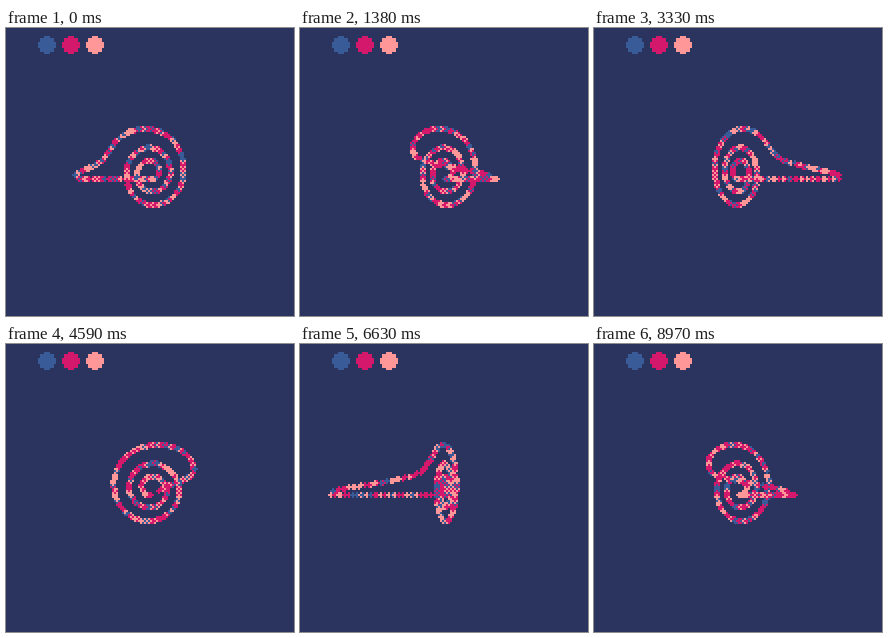
Recreate the animation shown at these times as an HTML page with a canvas. Size 288 px wide and 288 px high, loop 9000 ms.

```html
<!DOCTYPE html>
<html>
<head>
<meta charset="utf-8">
<style>
html, body { margin: 0; width: 100%; height: 100%; overflow: hidden; background: #2b335f; }
canvas { display: block; width: 288px; height: 288px; image-rendering: pixelated; }
</style>
</head>
<body>
<canvas width="144" height="144"></canvas>
<script>
const ctx = document.querySelector('canvas').getContext('2d');
const COLORS = ['#395c98', '#d4186c', '#ff9798'];
const FRAME = 30, LOOP = 9000, SPIN = 0.025, START = -0.511;
const FLAT_STEP = 2, DEEP_STEP = 3.6;

// Dense path: straight line in, flat spiral, then a tail that leaves the plane.
const path = [];
for (let i = 0; i <= 200; i++) {
  const u = 1 - i / 200;
  path.push([-20 * u, 6 - 0.5 * u, 113 * u]);
}
for (let k = 0; k <= 10; k += 0.01) {
  const r = 6 + 3.2 * k + 2.8 * Math.max(0, k - 8), a = k * Math.PI / 2;
  path.push([r * Math.sin(a), r * Math.cos(a), 0]);
}
const tail = [
  [12, -43, 0], [0, -44, 0], [-22, -42, 0], [-38, -33, 1], [-45, -20, 8],
  [-44, -13, 20], [-38, -8, 46], [-32, -3, 79], [-26, 2, 110], [-20, 6, 145]
];
const spline = (a, b, c, d, u) =>
  b + u / 2 * (c - a + u * (2 * a - 5 * b + 4 * c - d + u * (3 * (b - c) + d - a)));
for (let i = 0; i < tail.length - 3; i++) {
  const [a, b, c, d] = tail.slice(i, i + 4);
  for (let u = 0; u < 1; u += 0.01) path.push(b.map((v, j) => spline(a[j], v, c[j], d[j], u)));
}

// Beads along the path, closer together where it is flat.
const beads = [path[0]];
let run = 0;
for (let i = 1; i < path.length; i++) {
  const step = path[i][2] > 10 ? DEEP_STEP : FLAT_STEP;
  run += Math.hypot(...path[i].map((v, j) => v - path[i - 1][j]));
  if (run >= step) { run -= step; beads.push(path[i]); }
}

function random(seed) {
  return () => {
    seed = seed + 0x6d2b79f5 | 0;
    let t = Math.imul(seed ^ seed >>> 15, 1 | seed);
    t ^= t + Math.imul(t ^ t >>> 7, 61 | t);
    return ((t ^ t >>> 14) >>> 0) / 4294967296;
  };
}

function disc(x, y, r, color) {
  ctx.fillStyle = color;
  const limit = r * r + r / 2;
  for (let dy = -r; dy <= r; dy++) {
    const w = Math.floor(Math.sqrt(limit - dy * dy));
    ctx.fillRect(x - w, y + dy, 2 * w + 1, 1);
  }
}

function draw(frame) {
  ctx.fillStyle = '#2b335f';
  ctx.fillRect(0, 0, 144, 144);
  COLORS.forEach((c, i) => disc(20 + 12 * i, 8, 4, c));

  const rnd = random(frame * 7919 + 1);
  const cos = Math.cos(START + SPIN * frame), sin = Math.sin(START + SPIN * frame);
  for (const [x, y, z] of beads) {
    const pick = rnd(), color = COLORS[pick < 0.2 ? 0 : pick < 0.63 ? 1 : 2];
    disc(Math.round(72 + (x * cos + z * sin) / 2), Math.round(72 + y / 2), 1, color);
  }
}

const begin = performance.now();
function tick() {
  draw(Math.floor((performance.now() - begin) % LOOP / FRAME));
  requestAnimationFrame(tick);
}
tick();
</script>
</body>
</html>
```
